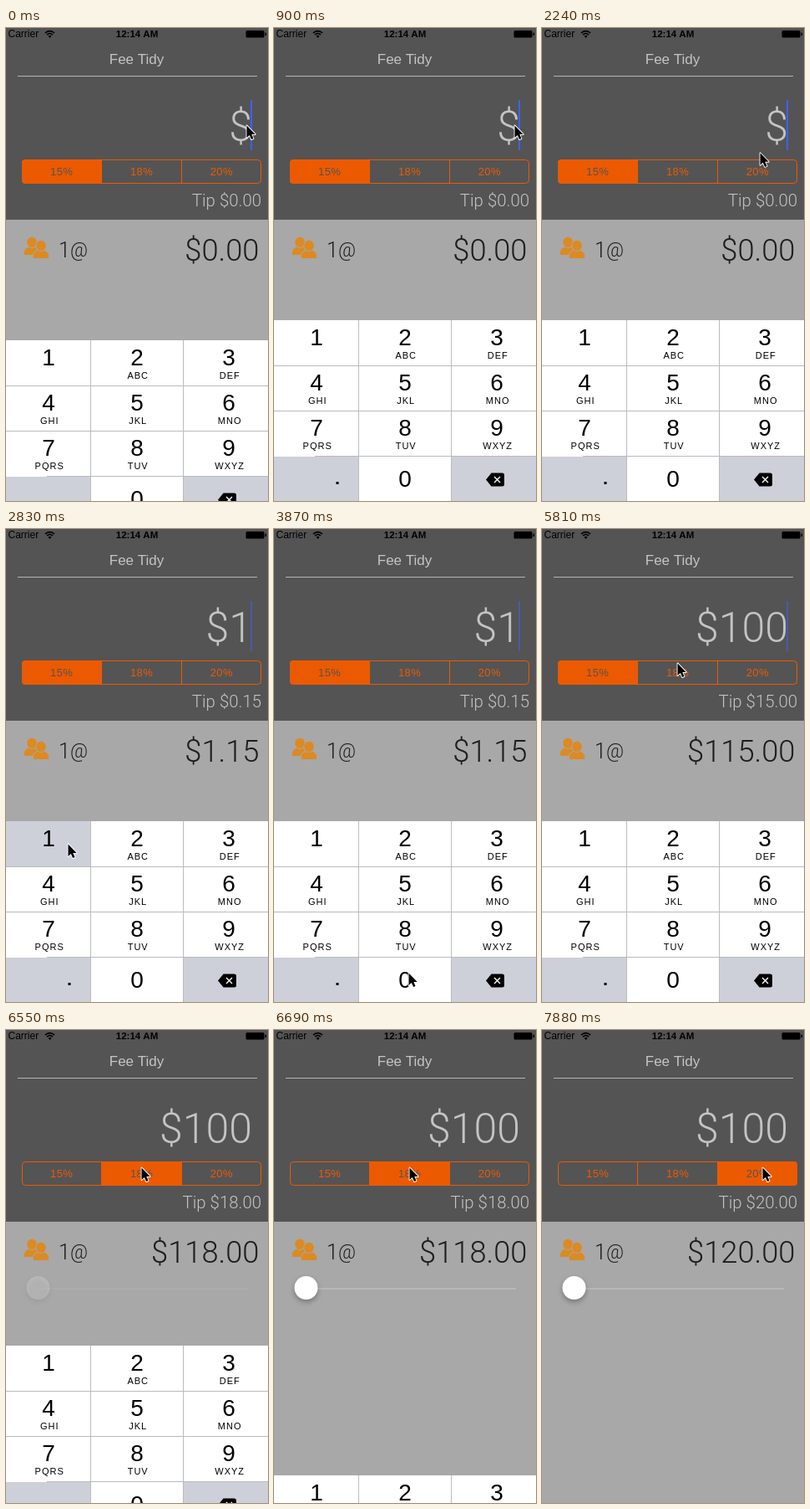
These frames come from a looping animation (314 px wide and 565 px high, 8000 ms). An HTML page with a canvas:

```html
<!DOCTYPE html>
<html lang="en">
<head>
<meta charset="utf-8">
<title>Tip calculator</title>
<style>
  html, body { margin: 0; width: 100%; height: 100%; overflow: hidden; background: #a8a8a8; }
  canvas { display: block; }
</style>
</head>
<body>
<canvas id="stage" width="314" height="565"></canvas>
<script>
const g = document.getElementById('stage').getContext('2d');
const LOOP = 8000, BEAT = 148.6;   // the screen refreshes once per beat
const SHOW = -205, HIDE = 6504;    // when the keyboard starts to rise and to leave
const SANS = '"Liberation Sans", Arial, sans-serif';
const LIGHT = 'Roboto, "Liberation Sans", sans-serif';
const ORANGE = '#ec5a00', DARK = '#545454', GREY = '#a8a8a8', PALE = '#c4c4c4';
const INK = '#1e1e1e', KEY = '#cdd0d8';

// pointer path: beat, x, y
const PATH = [
  [14, 288, 116], [18.5, 74, 376], [20, 74, 376], [22.4, 157, 528], [24, 161, 530],
  [35.5, 161, 530], [39, 162, 160], [41, 162, 164], [46.3, 162, 164], [50.2, 264, 164]
];
const ARROW = new Path2D('M0 0V14.5L3.3 11.5L5.6 16.6L8 15.6L5.8 10.5H10.2Z');
const LETTERS = ['', 'ABC', 'DEF', 'GHI', 'JKL', 'MNO', 'PQRS', 'TUV', 'WXYZ'];
const COLS = [[0, 101, 51], [102, 110, 157], [213, 101, 267]];     // left, width, label centre
const SEGMENTS = [[19, 96, 15], [114, 97, 18], [210, 96, 20]];     // left, width, percent

const clamp = v => Math.max(0, Math.min(1, v));
const spring = ms => ms < 0 ? 1 : (1 + .0183 * ms) * Math.exp(-.0183 * ms);

function rect(x, y, w, h, color) {
  g.fillStyle = color;
  g.fillRect(x, y, w, h);
}

function text(s, x, y, size, color, align = 'left', weight = 400, family = SANS, spacing = 0) {
  g.font = `${weight} ${size}px ${family}`;
  g.letterSpacing = spacing + 'px';
  g.textAlign = align;
  g.fillStyle = color;
  g.fillText(s, x, y);
}

const thin = (s, x, y, size, color, align) => text(s, x, y, size, color, align, 300, LIGHT);

function statusBar() {
  text('Carrier', 2.5, 11, 12, '#000');
  text('12:14 AM', 157, 11, 11.5, '#000', 'center', 700);
  g.strokeStyle = '#000';
  g.lineWidth = 1.7;
  for (const r of [4.8, 7.8]) {
    g.beginPath();
    g.arc(52.5, 11.5, r, -Math.PI * .75, -Math.PI * .25);
    g.stroke();
  }
  g.fillStyle = '#000';
  g.beginPath();
  g.moveTo(52.5, 12);
  g.arc(52.5, 11.5, 2.6, -Math.PI * .75, -Math.PI * .25);
  g.fill();
  g.beginPath();
  g.roundRect(287.5, 3, 22, 8.5, 1.5);
  g.roundRect(310.5, 5.5, 1.5, 3.5, .5);
  g.fill();
}

function segments(chosen, pressed) {
  g.save();
  g.beginPath();
  g.roundRect(19, 157, 287, 29, 4);
  g.clip();
  SEGMENTS.forEach(([x, w], i) => {
    if (i === chosen) rect(x, 157, w, 29, ORANGE);
    else if (i === pressed) rect(x, 157, w, 29, 'rgba(236,90,0,.2)');
    if (i) rect(x, 157, 1, 29, ORANGE);
  });
  g.restore();
  g.strokeStyle = ORANGE;
  g.lineWidth = 1;
  g.beginPath();
  g.roundRect(19.5, 157.5, 286, 28, 4);
  g.stroke();
  SEGMENTS.forEach(([, , p], i) =>
    text(p + '%', 66.7 + i * 95.8, 176, 13, i === chosen ? DARK : ORANGE, 'center', 400, SANS, .4));
}

function person(x, y) {
  g.fillStyle = '#dc8a22';
  g.strokeStyle = GREY;
  g.lineWidth = 2;
  g.beginPath();
  g.moveTo(x - 9, y + 15);
  g.bezierCurveTo(x - 10, y + 8, x - 6, y + 7, x - 3, y + 5);
  g.lineTo(x + 3, y + 5);
  g.bezierCurveTo(x + 6, y + 7, x + 10, y + 8, x + 9, y + 15);
  g.closePath();
  g.stroke();
  g.fill();
  g.beginPath();
  g.ellipse(x, y, 5.7, 6.2, 0, 0, 7);
  g.stroke();
  g.fill();
}

function slider(alpha) {
  g.save();
  g.globalAlpha = alpha;
  rect(38, 308, 252, 2, '#b8b8b8');
  g.shadowColor = 'rgba(0,0,0,.3)';
  g.shadowBlur = 6;
  g.shadowOffsetY = 3;
  g.fillStyle = '#fff';
  g.beginPath();
  g.arc(38.5, 308, 14, 0, 7);
  g.fill();
  g.restore();
}

function backspace() {
  g.fillStyle = '#000';
  g.beginPath();
  g.moveTo(254, 539.5);
  g.lineTo(260.5, 531.5);
  g.arcTo(276, 531.5, 276, 540, 2.5);
  g.arcTo(276, 547.5, 265, 547.5, 2.5);
  g.lineTo(260.5, 547.5);
  g.fill();
  g.strokeStyle = '#fff';
  g.lineWidth = 1.4;
  g.beginPath();
  g.moveTo(264, 536);
  g.lineTo(271, 543);
  g.moveTo(271, 536);
  g.lineTo(264, 543);
  g.stroke();
}

function keyboard(shift, pressed) {
  g.save();
  g.translate(0, shift);
  rect(0, 349, 314, 216, '#b9bbc0');
  for (let n = 0; n < 12; n++) {
    const [x, w, mid] = COLS[n % 3], row = n / 3 | 0, y = 349 + row * 54;
    const label = row < 3 ? String(n + 1) : n === 10 ? '0' : '';
    rect(x, row ? y + 1 : y, w, row ? 53 : 54, !label || label === pressed ? KEY : '#fff');
    text(label, mid, y + (row < 3 ? 29.5 : 36.5), 28, '#000', 'center');
    if (row < 3) text(LETTERS[n], mid + 1.2, y + 45.5, 11, '#000', 'center', 400, SANS, 1);
  }
  rect(0, 511, 49, 1, '#fff');
  rect(74.5, 542, 3, 3, '#000');
  backspace();
  g.restore();
}

function pointer(b) {
  let i = 0;
  while (i < PATH.length - 2 && b > PATH[i + 1][0]) i++;
  const [t0, x0, y0] = PATH[i], [t1, x1, y1] = PATH[i + 1];
  const u = clamp((b - t0) / (t1 - t0)), e = u * u * (3 - 2 * u);
  g.save();
  g.translate(x0 + (x1 - x0) * e + .5, y0 + (y1 - y0) * e + .5);
  g.lineJoin = 'round';
  g.strokeStyle = '#fff';
  g.lineWidth = 1.8;
  g.stroke(ARROW);
  g.fillStyle = '#000';
  g.fill(ARROW);
  g.restore();
}

function caretAlpha(b) {
  if (b >= 44) return 0;
  if (b >= 28 && b < 36) return 1;   // stays lit while typing
  return [.5, 0, 0, .5, 1, 1, 1][(b < 28 ? b + 5 : b - 36) % 7];
}

function draw(b) {
  const ms = b * BEAT;
  const amount = b < 19 ? 0 : b < 27 ? 1 : b < 32 ? 10 : 100;
  const chosen = b < 44 ? 0 : b < 52 ? 1 : 2;
  const tip = amount * SEGMENTS[chosen][2] / 100;
  const key = b === 19 ? '1' : b === 27 || b === 32 ? '0' : '';
  const hidden = ms < HIDE ? spring(ms - SHOW) : 1 - spring(ms - HIDE);

  rect(0, 0, 314, 565, GREY);
  rect(0, 0, 314, 229, DARK);
  statusBar();
  text('Fee Tidy', 156.5, 43, 17, PALE, 'center');
  rect(14, 57, 287, 1, '#b4b4b4');
  thin('$' + (amount || ''), 295, 135, 50, PALE, 'right');
  g.globalAlpha = caretAlpha(b);
  rect(293, 86, 2, 60, '#4060ff');
  g.globalAlpha = 1;
  segments(chosen, b === 43 ? 1 : b === 51 ? 2 : -1);
  thin('Tip $' + tip.toFixed(2), 306, 213, 20.4, PALE, 'right');

  person(31, 256);
  person(42, 260);
  thin('1', 63, 274, 25, INK);
  thin('@', 77, 273, 23, INK);
  thin('$' + (amount + tip).toFixed(2), 303.5, 278, 36.3, INK, 'right');
  slider(clamp((ms - HIDE) / 170));
  keyboard(Math.round(216 * hidden), key);
  pointer(b);
}

function frame() {
  draw(Math.floor(performance.now() % LOOP / BEAT));
  requestAnimationFrame(frame);
}
frame();
</script>
</body>
</html>
```
